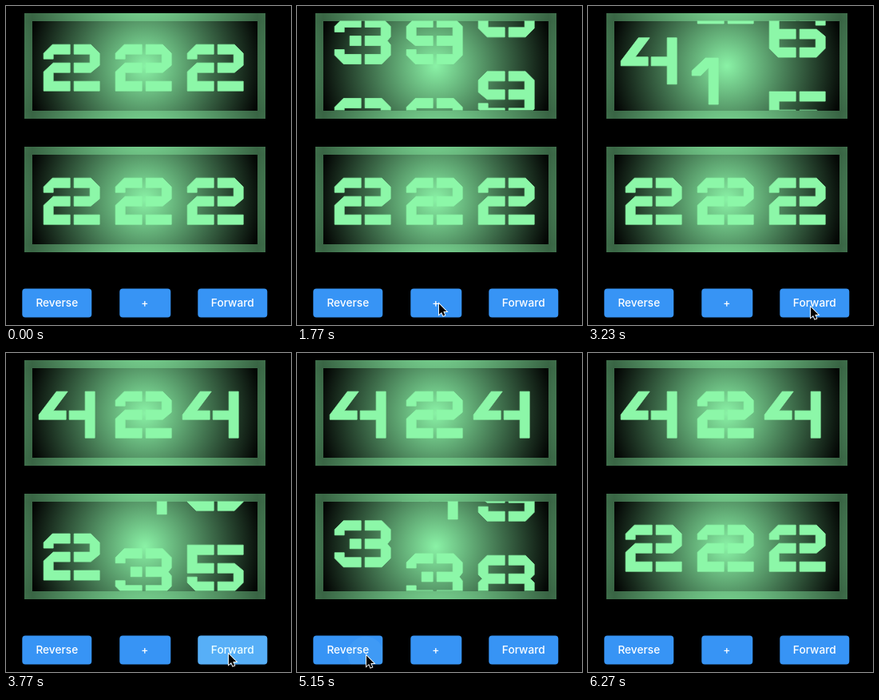
These frames come from a looping animation (357 px wide and 399 px high, 6940 ms). An HTML page with a canvas:

```html
<!DOCTYPE html>
<html lang="en">
<head>
<meta charset="utf-8">
<title>Rolling counters</title>
<style>
html, body { margin: 0; width: 100%; height: 100%; overflow: hidden; background: #000; }
.panel {
  position: absolute; left: 22.5px; width: 282px; height: 112px;
  border: 10px solid rgba(140, 247, 168, .4);
  background: radial-gradient(circle, #8af2a6, #000);
}
.btn {
  position: absolute; top: 353px; height: 36px; border-radius: 4px;
  background: #3794f5; color: #fff; text-align: center;
  font: 500 13.7px/36px Inter, sans-serif; transform: translate(.3px, .4px);
}
canvas { position: absolute; left: 0; top: 0; }
</style>
</head>
<body>
<div class="panel" style="top:8.5px"></div>
<div class="panel" style="top:175.5px"></div>
<div class="btn" style="left:20px;width:87px">Reverse</div>
<div class="btn" style="left:141.5px;width:64px">+</div>
<div class="btn" style="left:240px;width:87px">Forward</div>
<canvas id="stage" width="357" height="399"></canvas>
<script>
const LOOP = 6940, FRAME = 100 / 3, PITCH = 101;
const ctx = document.getElementById('stage').getContext('2d');

// Stencil digits on a 70 x 58 grid, built from shared pieces
const topLeft = 'M0 11L11 0H33V12H12V18H0Z';
const lowLeft = 'M0 40H12V46H33V58H11L0 47Z';
const lowRight = 'M38 23H59L70 32V47L59 58H38V46H58V35H38Z';
const digits = [
  'M0 11L11 0H33V12H12V46H33V58H11L0 47ZM38 0H59L70 11V47L59 58H38V46H58V12H38Z',
  'M10 0H26V58H14V12L4 22H-7V16Z',
  topLeft + 'M12 23H33V35H12V46H33V58H0V34ZM38 0H59L70 11V26L59 35H38V23H58V12H38ZM38 46H70V58H38Z',
  topLeft + lowLeft + 'M19 23H33V35H19ZM38 0H59L70 11V24L66 29L70 34V47L59 58H38V46H58V35H38V23H58V12H38Z',
  'M16 0H30L12 24H28V35H-6V29ZM32 24H52V0H64V58H52V35H32Z',
  'M0 0H33V12H12V23H33V35H0ZM38 0H70V12H38Z' + lowLeft + lowRight,
  'M0 11L11 0H33V12H12V23H33V35H12V46H33V58H11L0 47ZM38 0H59L70 11V18H58V12H38Z' + lowRight,
  'M0 0H33V12H0ZM38 0H70V14L50 36V58H38V32L56 12H38Z',
  'M0 11L11 0H33V12H12V23H33V35H12V46H33V58H11L0 47V34L5 29L0 24Z' +
    'M38 0H59L70 11V24L65 29L70 34V47L59 58H38V46H58V35H38V23H58V12H38Z',
  'M0 11L11 0H33V12H12V23H33V35H11L0 26Z' + lowLeft +
    'M38 0H59L70 11V47L59 58H38V46H58V35H38V23H58V12H38Z'
].map(d => new Path2D(d));

const arrow = new Path2D('M0 0V13.2L3.1 10.4L5.1 15.1L7.3 14.2L5.3 9.5H9.4Z');

// marks: [start ms, step at start, most steps until the next mark]
const runs = [
  { panel: 0, from: 222, to: 323, steps: 30, marks: [[1130, 1]] },
  { panel: 0, from: 323, to: 424, steps: 30, marks: [[2320, -.5, 3], [2463.3, 4.5]] },
  { panel: 1, from: 222, to: 345, steps: 37.14, marks: [[3610, 0, 18], [4256.7, 19]] },
  { panel: 1, from: 345, to: 222, steps: 37.14, marks: [[5083.3, 0, 2], [5246.6, 7.4]] }
];

const buttons = { reverse: [20, 87], plus: [141.5, 64], forward: [240, 87] };
const clicks = [
  [1110, 'plus', 177, 371], [2330, 'plus', 187, 382],
  [3610, 'forward', 278, 375], [5100, 'reverse', 86, 377]
];

// Pointer path: [ms, x, y]
const path = [
  [670, 150, 402], [970, 177, 371], [1830, 177, 371], [2100, 187, 382],
  [2600, 187, 382], [3150, 278, 375], [3950, 278, 375], [4200, 262, 402],
  [4900, 96, 402], [5080, 86, 377], [5400, 86, 377], [5650, 70, 402]
];

const clamp = (v, lo, hi) => Math.min(hi, Math.max(lo, v));

function progress(run, t) {
  const mark = run.marks.filter(m => t >= m[0]).pop();
  if (!mark) return 0;
  const [start, first, most = Infinity] = mark;
  const n = Math.min(most, Math.floor((t - start) / FRAME + .002));
  return clamp((first + n) / run.steps, 0, 1);
}

function drawPanel(panel, t) {
  const mine = runs.filter(r => r.panel === panel);
  const run = mine.filter(r => t >= r.marks[0][0]).pop() || mine[0];
  const k = progress(run, t);
  ctx.save();
  ctx.translate(0, panel * 167);
  ctx.beginPath();
  ctx.rect(32.5, 18.5, 282, 112);
  ctx.clip();
  ctx.fillStyle = ctx.strokeStyle = '#8cf7a8';
  ctx.lineWidth = .8;
  [100, 10, 1].forEach((unit, col) => {
    const a = Math.floor(run.from / unit), b = Math.floor(run.to / unit);
    const pos = a + (b - a) * k, base = Math.floor(pos);
    for (let d = base - 1; d <= base + 2; d++) {
      ctx.save();
      ctx.translate(47.2 + col * 90, 48.2 + (pos - d) * PITCH);
      ctx.fill(digits[d % 10]);
      ctx.stroke(digits[d % 10]);
      ctx.restore();
    }
  });
  ctx.restore();
}

function drawRipple([start, name, x, y], t) {
  const age = t - start;
  if (age <= 0 || age > 600) return;
  const [left, width] = buttons[name];
  const alpha = .25 * Math.min(1, age / 100) ** 2 * clamp((600 - age) / 350, 0, 1);
  ctx.save();
  ctx.beginPath();
  ctx.roundRect(left + .3, 353.4, width, 36, 4);
  ctx.clip();
  ctx.fillStyle = `rgba(185,255,255,${alpha})`;
  ctx.beginPath();
  ctx.arc(x, y, age * .45, 0, 7);
  ctx.fill();
  ctx.restore();
}

function drawPointer(t) {
  const i = path.findIndex(p => p[0] > t);
  if (i < 1) return;
  const [t0, x0, y0] = path[i - 1], [t1, x1, y1] = path[i];
  const k = (t - t0) / (t1 - t0), e = k * k * (3 - 2 * k);
  ctx.save();
  ctx.translate(x0 + (x1 - x0) * e + 1, y0 + (y1 - y0) * e + 1.5);
  ctx.lineWidth = 1.8;
  ctx.strokeStyle = '#fff';
  ctx.stroke(arrow);
  ctx.fillStyle = '#000';
  ctx.fill(arrow);
  ctx.restore();
}

const origin = performance.now();
function draw() {
  const t = Math.floor((performance.now() - origin) % LOOP / 10) * 10;
  ctx.clearRect(0, 0, 357, 399);
  drawPanel(0, t);
  drawPanel(1, t);
  clicks.forEach(c => drawRipple(c, t));
  drawPointer(t);
  requestAnimationFrame(draw);
}
draw();
</script>
</body>
</html>
```
